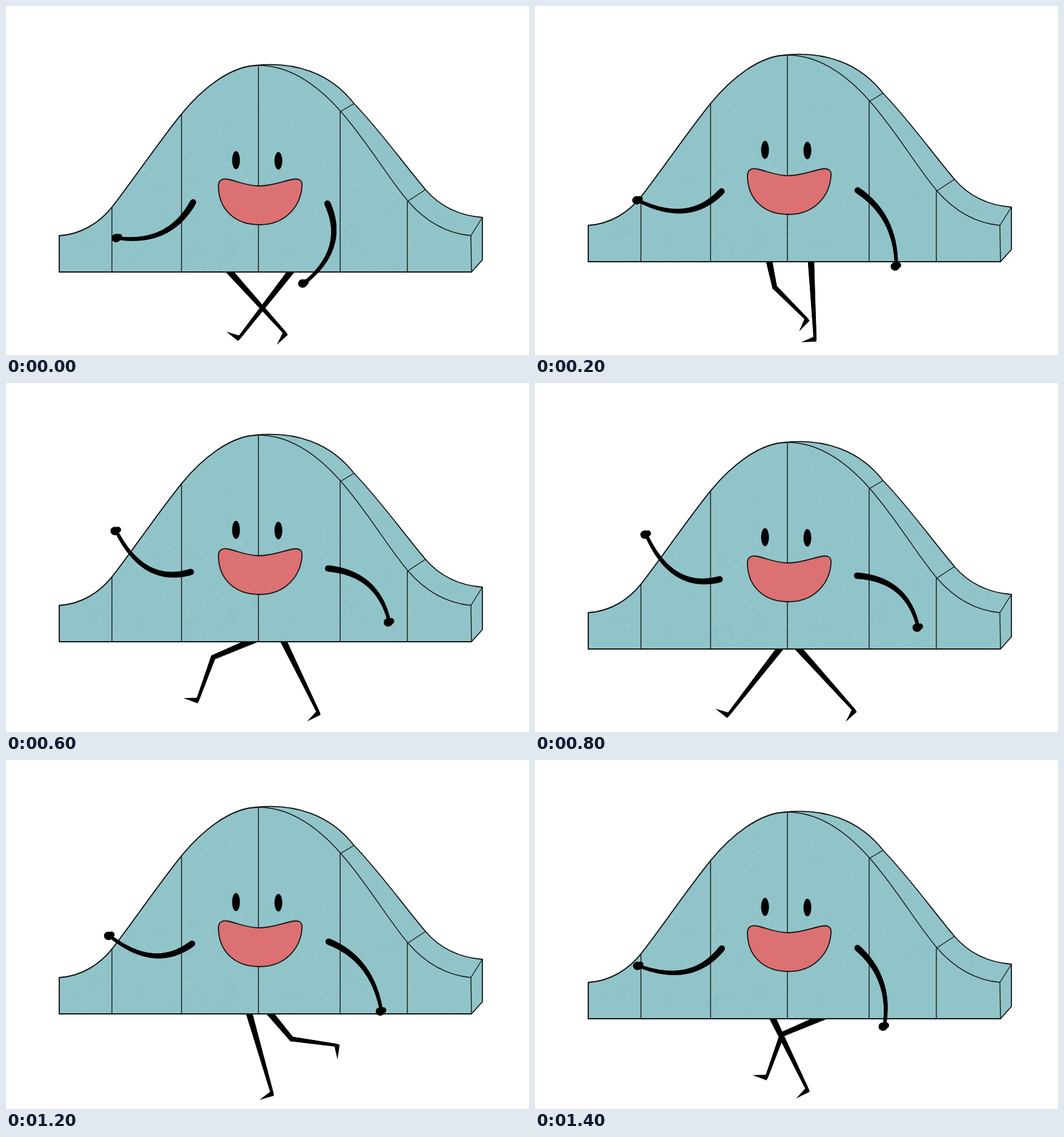
Animation of 864x576 px, one loop 1.6 s. Source, as an HTML page with a canvas:

```html
<!DOCTYPE html>
<html lang="en">
<head>
<meta charset="utf-8">
<title>Walking bell curve</title>
<style>
html, body { margin: 0; width: 100%; height: 100%; overflow: hidden; background: #fff; }
canvas { display: block; }
</style>
</head>
<body>
<canvas id="stage" width="864" height="576"></canvas>
<script>
const W = 864, H = 576, STEP = 200, STEPS = 8;
const ctx = document.getElementById('stage').getContext('2d');

// Height of the body's base line through the walk; the body is drawn at FLOOR.
const FLOOR = 439;
const bob = [439, 422, 419, 427, 439, 433, 419, 427];

// Arms hanging, half raised and raised: shoulder, middle, wrist; y from the base line.
const leftArm = [
  [309, -115, 258, -65, 184, -56],
  [308, -116, 246, -86, 170, -106],
  [305, -115, 235, -124, 184, -190]
];
const rightArm = [
  [531, -113, 538, -43, 492, 19],
  [533, -118, 583, -67, 602, 6],
  [532, -121, 599, -97, 633, -36]
];

// One stride, shared by both legs half a cycle apart:
// hip shift, thigh length, thigh angle and shin angle in degrees.
const SHIN = 76, FOOT = 23;
const stride = [
  [12, 63, -38, -38], [-2, 52, 3, 3], [10, 61, 16, 16], [1, 55, 26, 26],
  [-22, 61, 42, 42], [-5, 43, 12, 45], [-21, 54, 40, 82], [11, 66, -67, -20]
];

const leftSlope = `M88 379 C125 377 155 357 175 332
  C208 290 252 225 290 178 C322 139 370 98 417 98`;
const frontSlope = `C470 98 515 131 553 174
  C600 228 630 282 664 322 C690 352 725 375 768 379`;
const backSlope = `C478 91 536 111 575 161
  C620 208 655 258 693 303 C717 331 750 346 787 349`;
const front = new Path2D(`${leftSlope} ${frontSlope} L769 439 H88 Z`);
const outline = new Path2D(`${leftSlope} L412 98 ${backSlope} V419 L769 439 H88 Z`);
const seams = new Path2D(`M175 332 V439 M290 178 V439 M417 98 V439
  M552 174 V439 M663 322 V439
  M553 174 L575 161 M664 322 L693 303 M768 379 L787 349`);
const mouth = new Path2D(`M351 299 C350 287 358 284 367 286
  C385 290 398 297 419 297 C440 297 458 289 474 286
  C484 284 490 288 489 297 C487 330 462 361 419 361
  C378 361 352 336 351 299 Z`);

function seeded(seed) {
  return () => (seed = (seed * 16807) % 2147483647) / 2147483647;
}

function ellipse(g, x, y, rx, ry, turn = 0) {
  g.beginPath();
  g.ellipse(x, y, rx, ry, turn, 0, Math.PI * 2);
  g.fill();
}

function speckle(g) {
  const rnd = seeded(41);
  const blot = (n, rx, ry) => {
    for (let i = 0; i < n; i++) {
      ellipse(g, 88 + rnd() * 700, 98 + rnd() * 341,
        rx * (0.3 + rnd()), ry * (0.3 + rnd()), rnd() * 3);
    }
  };
  g.fillStyle = 'rgba(176,218,219,.2)';
  blot(500, 1.6, 1.2);
  blot(60, 4, 2.5);
  g.fillStyle = 'rgba(110,170,178,.06)';
  blot(70, 22, 6);
}

function makeBody() {
  const sheet = document.createElement('canvas');
  sheet.width = W;
  sheet.height = H;
  const g = sheet.getContext('2d');
  g.lineJoin = 'round';
  g.fillStyle = '#91c4c9';
  g.fill(outline);
  g.save();
  g.clip(outline);
  speckle(g);
  g.restore();

  g.strokeStyle = '#151515';
  g.lineWidth = 1.4;
  g.stroke(seams);
  g.stroke(front);
  g.lineWidth = 1.8;
  g.stroke(outline);

  g.fillStyle = '#dc7173';
  g.fill(mouth);
  g.stroke(mouth);
  g.fillStyle = '#000';
  ellipse(g, 380, 254.5, 6.5, 15);
  ellipse(g, 450, 255.5, 6.5, 14.5);
  return sheet;
}

// Stroke whose width goes from w0 to w1 along the curve at(t).
function taper(at, w0, w1, n = 40) {
  let [x, y] = at(0);
  for (let i = 1; i <= n; i++) {
    const [nx, ny] = at(i / n);
    ctx.lineWidth = w0 + (w1 - w0) * i / n;
    ctx.beginPath();
    ctx.moveTo(x, y);
    ctx.lineTo(nx, ny);
    ctx.stroke();
    [x, y] = [nx, ny];
  }
}

function limb(x0, y0, x1, y1, w0, w1) {
  taper(t => [x0 + (x1 - x0) * t, y0 + (y1 - y0) * t], w0, w1, 16);
}

// Parabola through a at 0, b at 1/2 and c at 1.
function through(a, b, c, t) {
  return a * (1 - t) * (1 - 2 * t) + 4 * b * t * (1 - t) + c * t * (2 * t - 1);
}

function drawArm([low, half, high], lift, y) {
  const [sx, sy, mx, my, hx, hy] = low.map((v, i) => through(v, half[i], high[i], lift));
  taper(t => [through(sx, mx, hx, t), y + through(sy, my, hy, t)], 10.5, 5.5);
  ellipse(ctx, hx - 2, y + hy, 7.5, 7);
  ellipse(ctx, hx + 3, y + hy - 2, 5, 5);
}

function drawLeg(side, phase, y) {
  const [shift, length, thigh, shin] = stride[phase % STEPS];
  const dir = deg => [Math.sin(deg * Math.PI / 180), Math.cos(deg * Math.PI / 180)];
  const [tx, ty] = dir(thigh), [sx, sy] = dir(shin);
  const x = side + shift;
  const kx = x + tx * length, ky = y + ty * length;
  const ax = kx + sx * SHIN, ay = ky + sy * SHIN;
  limb(x - tx * 12, y - ty * 12, kx, ky, 11, 8);
  limb(kx, ky, ax, ay, 8, 5);

  // The foot points back, square to the shin.
  ctx.beginPath();
  ctx.moveTo(ax + sx * 4 - sy * FOOT, ay + sy * 4 + sx * FOOT);
  ctx.lineTo(ax - sx * 5, ay - sy * 5);
  ctx.lineTo(ax + sx * 4 + sy * 2, ay + sy * 4 - sx * 2);
  ctx.fill();
}

const body = makeBody();
ctx.lineCap = 'round';

function draw(k) {
  const y = bob[k];
  const lift = Math.sin(Math.PI * (k / STEPS) ** 0.9);
  ctx.fillStyle = '#fff';
  ctx.fillRect(0, 0, W, H);
  ctx.fillStyle = ctx.strokeStyle = '#000';
  drawLeg(392, k + 4, y);
  drawLeg(458, k, y);
  ctx.drawImage(body, 0, y - FLOOR);
  drawArm(leftArm, lift, y);
  drawArm(rightArm, lift, y);
}

const start = performance.now();
function tick() {
  const time = performance.now() - start;
  draw(Math.floor(time / STEP) % STEPS);
  requestAnimationFrame(tick);
}
tick();
</script>
</body>
</html>
```
